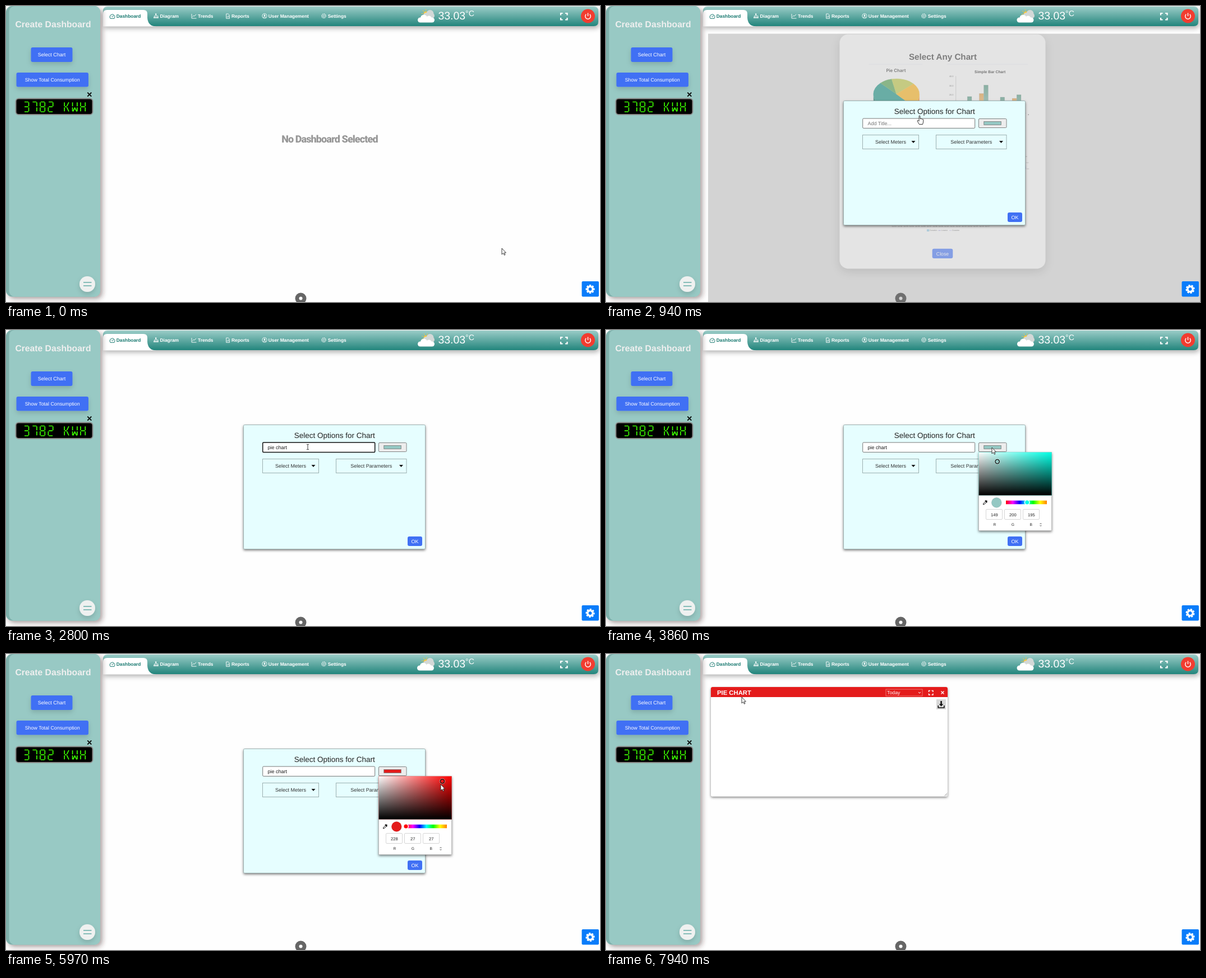
Animation, 1059 px wide and 529 px high, one loop 8000 ms. Source, as an HTML page:

```html
<!DOCTYPE html>
<html lang="en">
<head>
<meta charset="utf-8">
<title>Dashboard</title>
<style>
html, body { margin: 0; width: 100%; height: 100%; overflow: hidden; background: #fefefe; }
svg { display: block; width: 100%; height: 100%; }
text { font-family: "Liberation Sans", Arial, sans-serif; text-rendering: geometricPrecision; }
.b { font-weight: 700; }
.m { text-anchor: middle; }
.e { text-anchor: end; }
.w { fill: #fff; }
.serif { font-family: "Liberation Serif", Times, serif; font-weight: 700; }
.line { fill: none; stroke: #fff; stroke-width: 1; }
</style>
</head>
<body>
<svg id="stage" viewBox="0 0 1059 529" preserveAspectRatio="none">
  <defs>
    <linearGradient id="bar" x2="0" y2="1"><stop stop-color="#9accc7"/><stop offset="1" stop-color="#23857c"/></linearGradient>
    <linearGradient id="white"><stop stop-color="#fff"/><stop offset="1" stop-color="#fff" stop-opacity="0"/></linearGradient>
    <linearGradient id="black" x2="0" y2="1"><stop stop-opacity="0"/><stop offset="1"/></linearGradient>
    <linearGradient id="fade" x2="0" y2="1"><stop stop-color="#fff" stop-opacity="0"/><stop offset="1" stop-color="#fff" stop-opacity=".4"/></linearGradient>
    <linearGradient id="hues"></linearGradient>
    <filter id="soft" x="-20%" y="-50%" width="140%" height="220%"><feDropShadow dx="2" dy="4" stdDeviation="4" flood-opacity=".3"/></filter>
    <filter id="light" x="-30%" y="-60%" width="160%" height="260%"><feDropShadow dx="0" dy="4" stdDeviation="4" flood-opacity=".15"/></filter>
    <filter id="side" x="-10%" y="-5%" width="130%" height="112%"><feDropShadow dx="4" dy="4" stdDeviation="4.5" flood-color="#402828" flood-opacity=".42"/></filter>
    <filter id="box" x="-10%" y="-10%" width="120%" height="125%"><feDropShadow dx="0" dy="2" stdDeviation="2" flood-opacity=".5"/></filter>
    <filter id="pop" x="-10%" y="-10%" width="120%" height="125%"><feDropShadow dx="0" dy="5" stdDeviation="8" flood-opacity=".2"/></filter>
  </defs>

  <rect width="1059" height="529" fill="#fefefe"/>
  <text id="empty" class="m" x="577" y="244" font-size="18" fill="#989898" style="font-family:Roboto,sans-serif;font-weight:900;letter-spacing:-.9px">No Dashboard Selected</text>
  <g id="knob"><circle cx="525.5" cy="522.5" r="10" fill="#666"/><circle cx="525.5" cy="522.5" r="3" fill="#fff"/></g>

  <g id="card">
    <rect x="187" y="59" width="422" height="195.5" rx="3" fill="#fff" filter="url(#box)"/>
    <path d="M187 77V62q0-3 3-3H606q3 0 3 3V77Z" fill="#e41b1b"/>
    <text class="b w" x="198" y="72.7" font-size="11.3">PIE CHART</text>
    <rect x="499" y="63" width="65" height="12" fill="none" stroke="#ee8d86" stroke-width=".8"/>
    <text class="w" x="501" y="72.2" font-size="8.8">Today</text>
    <path class="line" d="M557 68l2 2.2 2-2.2" stroke-width="1.2"/>
    <path class="line" d="M575.5 68V65.500h2.500M580.500 65.500H583V68M583 70.500V73h-2.500M578 73h-2.500V70.500" style="stroke-width:1.4"/>
    <path class="line" d="M597.500 66.500l5 5M602.500 66.500l-5 5" style="stroke-width:1.4"/>
    <rect x="589" y="81" width="17" height="18" fill="#d9d9d9"/>
    <path d="M596.300 84h2.600v5.500h2.600l-3.900 4-3.900-4h2.600ZM591.500 92h1.600v3.200h9V92h1.600v4.800h-12.200Z" fill="#111"/>
    <path d="M603.500 253.500l5-5M606 253.500l2.500-2.500" stroke="#777" stroke-width=".7"/>
  </g>

  <rect id="shade" x="182" y="49.500" width="877" height="480"/>
  <g id="chooser"></g>
  <g id="options"></g>
  <g id="picker"></g>

  <g filter="url(#soft)"><path d="M181 1H1048q8 0 8 8V28q0 8-8 8H173V9q0-8 8-8Z" fill="url(#bar)"/></g>
  <path d="M173 36.500V14q0-7 7-7H245q7 0 7 7V21Q253 36.500 268 36.500Z" fill="#fff"/>
  <g id="nav"></g>
  <g id="sun"></g>
  <g fill="#d3d8d7"><circle cx="756" cy="13.500" r="6.500"/><circle cx="749" cy="16" r="4"/><rect x="744" y="13" width="20" height="9" rx="4.500"/></g>
  <g id="cloud" fill="#fff"><rect x="734" y="20.500" width="30" height="9" rx="4.500"/><circle cx="745" cy="21.500" r="6"/><circle cx="754" cy="22.500" r="5"/></g>
  <text class="w" x="770.500" y="24" font-size="19.400">33.03<tspan font-size="14" dy="-6">°C</tspan></text>
  <path class="line" d="M989 16.500V13h3.500M997 13h3.500v3.500M1000.500 21v3.500H997M992.500 24.500H989V21" style="stroke-width:2.200"/>
  <circle cx="1037.500" cy="18" r="12.500" fill="#f23c30"/>
  <path class="line" d="M1034.300 14.800a4.800 4.800 0 1 0 6.400 0M1037.500 12.500V18" style="stroke-width:1.400"/>

  <g filter="url(#side)"><rect width="168" height="519.500" rx="11" fill="#7eb0ab"/></g>
  <rect x="5.500" width="162.500" height="519.500" rx="10" fill="#98c9c4"/>
  <text class="b m" x="84" y="37.500" font-size="15.700" fill="#efefef">Create Dashboard</text>
  <g filter="url(#light)" fill="#4070f4">
    <rect x="44.500" y="74" width="74" height="26" rx="3"/>
    <rect x="18.500" y="119" width="128.500" height="25.500" rx="3"/>
  </g>
  <g id="focus" fill="none">
    <rect x="44.700" y="74" width="73.800" height="26" rx="2.500" stroke="#101010" stroke-width="1.500"/>
    <rect x="45.700" y="75" width="71.800" height="24" rx="2" stroke="#fff" stroke-width=".5" opacity=".6"/>
  </g>
  <text class="w m" x="81.500" y="90" font-size="9">Select Chart</text>
  <text class="w m" x="82.700" y="134.700" font-size="8.900">Show Total Consumption</text>
  <path d="M145.300 154.600l7 7M152.300 154.600l-7 7" stroke="#000" stroke-width="1.800"/>
  <rect x="17.500" y="165.500" width="137" height="28.500" rx="5" fill="#000" stroke="#8a8a8a" stroke-width="2"/>
  <g id="lcd" fill="none" stroke="#3cff00" stroke-width="1.700"></g>
  <g filter="url(#light)"><circle cx="145" cy="497" r="14" fill="#eff1f0"/></g>
  <path d="M138 494h14.500M138 500h14.500" stroke="#86bdb8" stroke-width="1.800"/>

  <rect x="1026.500" y="492" width="30.500" height="27.500" rx="2" fill="#0a7cfa"/>
  <g id="gear"></g>
  <g id="cursors" stroke="#222" stroke-width=".9" stroke-linejoin="round" fill="#fff">
    <path id="arrow" d="M0 0V11L2.600 8.700 4.400 12.300 6 11.600 4.300 8H7.400Z"/>
    <path id="hand" d="M-.9 8V1Q0-.6 1 1V6Q2.300 5 3 6.400 4.300 5.600 5 7 6.600 6.400 6.700 8.500V11.500L5.600 16H-.6L-3.700 10.500Q-4.300 8.400-2.300 9L-.9 10.300Z"/>
    <path id="beam" d="M-2-4.500H-.6L0-4 .6-4.500H2M0-4V4M-2 4.500H-.6L0 4 .6 4.500H2" fill="none"/>
  </g>
</svg>
<script>
const $ = id => document.getElementById(id);
const BLUE = '#4070f4';
const text = (x, y, size, str, cls = '', fill = '') =>
  `<text x="${x}" y="${y}" font-size="${size}" class="${cls}" ${fill && `fill="${fill}"`}>${str}</text>`;
const rect = (x, y, w, h, fill, more = '') =>
  `<rect x="${x}" y="${y}" width="${w}" height="${h}" fill="${fill}" ${more}/>`;
const path = (d, stroke, width = 1, fill = 'none') =>
  `<path d="${d}" fill="${fill}" stroke="${stroke}" stroke-width="${width}"/>`;
const dot = (x, y, r, fill, more = '') => `<circle cx="${x}" cy="${y}" r="${r}" fill="${fill}" ${more}/>`;
const each = (list, fn) => list.map(fn).join('');
const range = n => [...Array(n).keys()];
const polar = (cx, cy, rx, ry, deg) => {
  const a = deg * Math.PI / 180;
  return `${(cx + rx * Math.cos(a)).toFixed(2)} ${(cy + ry * Math.sin(a)).toFixed(2)}`;
};

function gearShape(r, hole, fill) {
  const teeth = each(range(8), i => `<rect x="${-r * .22}" y="${-r}" width="${r * .44}" height="${r}" rx=".6" transform="rotate(${i * 45})"/>`);
  return `<g fill="${fill}">${teeth}<circle r="${r * .76}"/></g><circle r="${r * .36}" fill="${hole}"/>`;
}

function pieChart() {
  const cx = 523.800, cy = 165, rx = 38, ry = 25.500, depth = 10;
  const slice = (from, to, fill) =>
    path(`M${cx} ${cy}L${polar(cx, cy, rx, ry, from)}A${rx} ${ry} 0 ${to - from > 180 ? 1 : 0} 1 ${polar(cx, cy, rx, ry, to)}Z`, fill, .3, fill);
  const wall = (from, to, fill) =>
    path(`M${polar(cx, cy, rx, ry, from)}A${rx} ${ry} 0 0 1 ${polar(cx, cy, rx, ry, to)}v${depth}A${rx} ${ry} 0 0 0 ${polar(cx, cy + depth, rx, ry, from)}Z`, 'none', 0, fill);
  return wall(47, 180, '#0a6f62') + wall(0, 47, '#f08a12') +
    slice(47, 226, '#0d8d7e') + slice(226, 258, '#4c9c48') +
    slice(258, 318, '#b9c43c') + slice(318, 407, '#f9ae12');
}

function simpleBars() {
  const tops = [[9, 19, 27], [6, 32, 46], [13, 4, 26], [7, 24, 30]];
  const fills = ['#8092c0', '#e0973a', '#4a917a'];
  const bar = (x, h, fill) => rect(x, 196 - h, 7.200, h, fill, 'stroke="#6665" stroke-width=".5"') + rect(x, 196 - h, 7.200, h, 'url(#fade)');
  return path('M622 135V196.500H738', '#999', .5) +
    each(range(5), i => text(618, 137 + i * 15, 3.600, `${40 - i * 10}.0`, 'e', '#555')) +
    each(tops, (group, g) => each(group, (h, i) => bar(626 + g * 27.200 + i * 7.500, h, fills[i])) +
      text(637 + g * 27.200, 202, 3.300, 2011 + g, 'm', '#444')) +
    dot(742, 199, .8, '#666');
}

function periodBars() {
  const now = [7, 6, 6, 6, 6, 15, 31, 40, 54, 55, 54, 49, 54, 46, 45, 52];
  const past = [5, 6, 6, 5, 6, 10, 18, 34, 47, 57, 51, 43, 58, 54, 47, 50, 53, 54, 53, 47];
  return each(range(7), i => path(`M473 ${223.500 + i * 10.250}H592`, '#ccc', .5) +
      text(470, 225 + i * 10.250, 4.600, 300 - i * 50, 'e', '#444')) +
    each(range(10), i => path(`M${473 + i * 12} 223.500V285`, '#ddd', .5) +
      text(476 + i * 12, 291.500, 4.300, `${i * 2}:00`, 'm', '#444')) +
    each(past, (h, i) => rect(474 + i * 5.950, 285 - h, 2.600, h, '#efa794')) +
    each(now, (h, i) => rect(476.600 + i * 5.950, 285 - h, 2.700, h, '#c23f28')) +
    path('M473 223V285H592', '#555', .6) +
    `<text transform="translate(461 271) rotate(-90)" font-size="4" fill="#444">Active Energy (kWh)</text>`;
}

function gauge() {
  const arc = r => `M${677 - r} 289A${r} ${r + 3} 0 0 1 ${677 + r} 289`;
  return path(arc(60), '#7c86da', 1.400) + path(arc(57.500), '#a9d8ee', 1.800) + path(arc(54.500), '#9a8fdc', .6) +
    each(range(41), i => {
      const a = 180 + i * 4.500;
      return path(`M${polar(677, 289, 54, 57, a)}L${polar(677, 289, i % 2 ? 52 : 50, i % 2 ? 55 : 53, a)}`, '#999', .4);
    }) +
    each(range(21), i => {
      const [x, y] = polar(677, 290, 64, 67, 180 + i * 9).split(' ');
      return text(x, y, 2.600, i * 10, 'm', '#888');
    }) +
    path('M675.500 289L674.500 226L678.500 289Z', '#6fb9d8', .5, '#8fd0e6') +
    path('M677 287.500L621 267.500L676 290Z', '#7d6fd0', .5, '#8d80da') + dot(677, 289, 2, '#7d55b8') +
    rect(654, 256.500, 11, 9.500, 'none', 'stroke="#6fc3dc" stroke-width=".8"') + text(659.500, 263, 4.500, '60', 'm', '#6fc3dc') +
    rect(689.500, 256.500, 11, 9.500, 'none', 'stroke="#9a8fdc" stroke-width=".8"') + text(695, 263, 4.500, '10', 'm', '#9a8fdc');
}

function barLine() {
  const bars = [4, 27, 37, 23, 44, 30, 24, 6, 3, 24, 63, 52, 35];
  const upper = [314, 321, 341, 362, 373, 367, 362, 357, 346, 333, 321, 318, 314, 333];
  const lower = [360, 353, 347, 362, 350, 356, 360, 366, 368, 352, 322, 330, 340, 354];
  const px = i => 520 + i * 9.620;
  const line = (ys, color) => path('M' + ys.map((y, i) => `${px(i)} ${y}`).join('L'), color, .6);
  return each(range(10), i => text(513, 311 + i * 7.800, 3.200, 900 - i * 50, 'e', '#777') +
      text(680, 311 + i * 7.800, 3.200, `${900 - i * 50}.00kwh`, '', '#777')) +
    each(bars, (h, i) => rect(px(i) - 4, 380.500 - h, 8, h, '#8cc3e0')) +
    each(range(17), i => text(px(i), 385, 3, `Jul ${String(i + 1).padStart(2, '0')}`, 'm', '#666')) +
    line(upper, '#b3afe0') + line(lower, '#7f7cc4') +
    each(upper, (y, i) => dot(px(i), y, .8, '#fff', 'stroke="#a49fd8" stroke-width=".5"')) +
    each(lower, (y, i) => dot(px(i), y, .9, '#6e6cba')) +
    dot(520, 314.500, 2.200, '#fff', 'stroke="#a49fd8" stroke-width=".6"') +
    text(523, 315.500, 3, 'Max 842', '', '#666') + text(561, 374, 3, 'Lowest', '', '#666') +
    text(589, 358.500, 3, 'Duration', '', '#666') + text(627, 319, 3, 'Highest', '', '#666') + text(646, 334, 3, 'last target', '', '#666') +
    `<text transform="translate(507 349) rotate(-90)" font-size="3.300" fill="#555">Power</text>` +
    `<text transform="translate(694 340) rotate(90)" font-size="3.300" fill="#555">Energy</text>` +
    rect(574, 389, 4, 3.500, '#8cc3e0') + text(579, 392, 3.200, 'Duration', '', '#555') +
    path('M593 390.800h4', '#7f7cc4', .8) + text(598, 392, 3.200, 'Lowest', '', '#555') +
    path('M611 390.800h4', '#b3afe0', .8) + text(616, 392, 3.200, 'Duration', '', '#555');
}

function buildChooser() {
  const rules = 'M478 115.500H567M607 115.500H741M458 206H566M458 297H574';
  $('chooser').innerHTML = `<g filter="url(#pop)">${rect(430, 66, 340, 388, '#f4f4f4', 'rx="14"')}</g>` +
    text(600.500, 108, 14.100, 'Select Any Chart', 'b m', '#333') + path(rules, '#dfe0ea', .8) +
    `<text x="523" y="128" font-size="7.300" class="b m" fill="#333" style="font-family:Inter,sans-serif;font-weight:600">Pie Chart</text>` +
    text(678.500, 130, 6.300, 'Simple Bar Chart', 'b m', '#222') +
    text(533.700, 216, 8, 'Period over Period', 'serif m', '#111') +
    text(677, 214.300, 6.500, 'Gauge Chart', 'serif m', '#111') +
    text(601.500, 307, 8.300, 'Bar Line Graph', 'serif m', '#111') +
    pieChart() + simpleBars() + periodBars() + gauge() + barLine() +
    rect(583, 421, 34, 16, BLUE, 'rx="3"') + text(600, 432, 8.100, 'Close', 'm w');
}

function buildOptions() {
  const drop = (x, w, label, cx, tri) => rect(x + .5, 230.500, w, 25, 'none', 'stroke="#9db0b0"') +
    text(cx, 246, 9, label, 'm', '#333') + path(`M${tri} 241h7l-3.500 4Z`, 'none', 0, '#111');
  $('options').innerHTML = `<g filter="url(#box)">${rect(423.500, 169.500, 324, 222, '#e6feff', 'rx="2" stroke="#8fa3a3" stroke-width=".8"')}</g>` +
    text(585.700, 192.700, 13.500, 'Select Options for Chart', 'm', '#222') +
    '<rect id="field" x="457.700" y="201" width="200" height="17.400" rx="1.500" fill="#fff"/><text id="typed" x="466.500" y="212.500" font-size="9"></text>' +
    rect(664.500, 201.500, 49.500, 16, '#ededed', 'rx="1.500" stroke="#777" stroke-width=".9"') +
    '<rect id="swatch" x="673.800" y="206.500" width="30.500" height="6" stroke="#777" stroke-width=".8"/>' +
    drop(457, 100, 'Select Meters', 507.500, 544.500) + drop(588, 125.500, 'Select Parameters', 651.200, 701) +
    rect(716, 369, 26, 17, BLUE, 'rx="3"') + text(729, 380.500, 9, 'OK', 'm w');
}

function buildPicker() {
  const field = (i, name) => rect(677.500 + i * 33, 320.500, 29, 18, '#fff', 'rx="1.500" stroke="#ccc" stroke-width=".8"') +
    `<text id="num${i}" class="m" x="${692.300 + i * 33}" y="332.500" font-size="7.600" fill="#222"></text>` +
    text(693 + i * 32.400, 350.300, 6.700, name, 'm', '#222');
  $('hues').innerHTML = each(range(7), i => `<stop offset="${i / 6}" stop-color="hsl(${Math.max(30, 360 - i * 60)},100%,50%)"/>`);
  $('picker').innerHTML = `<g filter="url(#box)">${rect(664.500, 218.500, 130, 140, '#fff', 'stroke="#aaa" stroke-width=".7"')}</g>` +
    '<rect id="plane" x="664.500" y="218.500" width="130" height="77"/>' +
    rect(664.500, 218.500, 130, 77, 'url(#white)') + rect(664.500, 218.500, 130, 77, 'url(#black)') +
    '<g id="ring"><circle r="4.600" fill="none" stroke="#fff" stroke-width=".6"/><circle id="spot" r="3.700" stroke="#111" stroke-width="1.300"/></g>' +
    path('M672.500 312l.5-2 4-4 1.500 1.500-4 4Z', '#111', 1) + path('M676 304.800l3.300 3.300M678 306.300l1.300-1.300', '#111', 2) +
    '<circle id="sample" cx="696.300" cy="308.500" r="9" stroke="#0002" stroke-width=".6"/>' +
    rect(713, 304.800, 73, 6.500, 'url(#hues)') +
    '<circle id="thumb" cy="308" r="4.300" stroke="#fff" stroke-width="1.500"/>' +
    each(['R', 'G', 'B'], (n, i) => field(i, n)) +
    path('M773.500 347l1.500-1.500 1.500 1.500M773.500 349l1.500 1.500 1.500-1.500', '#222', .8);
}

function buildNav() {
  const teal = '#1a7a71';
  const labels = [[196.700, 'Dashboard'], [274.500, 'Diagram'], [342, 'Trends'], [402, 'Reports'], [467.700, 'User Management'], [573.700, 'Settings']];
  $('nav').innerHTML = each(labels, ([x, s], i) => text(x, 21.300, 8.400, s, 'b', i ? '#fff' : teal)) +
    path('M186 22.300a4.500 4.500 0 1 1 7 0ZM189.500 20l2-3.200M187 18.500h.8', teal, 1) +
    path('M267.500 14.500v3M264.500 20v-2.300h6.500V20', '#fff', .8) +
    each([[266, 13.500], [263.300, 19.500], [266.300, 19.500], [269.300, 19.500]], ([x, y]) => rect(x, y, 2.300, 2.300, '#fff')) +
    path('M331 14v8h8.500M332.500 19.500l2-2.500 1.500 1.300 3-3.500', '#fff', .9) +
    path('M392.700 14h3.500l2.300 2.300V22.300h-5.800ZM394.500 20.500v-2M396.500 20.500v-3.500', '#fff', .9) +
    dot(461, 17.800, 4.100, 'none', 'stroke="#fff" stroke-width=".9"') + dot(461, 16.700, 1.500, '#fff') +
    path('M458.300 20.500q2.700-3 5.400 0', '#fff', 1) +
    dot(566.600, 17.800, 1.400, 'none', 'stroke="#fff" stroke-width=".8"') +
    dot(566.600, 17.800, 3.600, 'none', 'stroke="#fff" stroke-width="1.200" stroke-dasharray="1.900 .9"');
}

function buildLcd() {
  const seg = {
    a: 'M1.500 1H8.500', b: 'M9 1.800V8.700', c: 'M9 10.700V17.700', d: 'M1.500 18.500H8.500', e: 'M.7 10.700V17.700',
    f: 'M.7 1.800V8.700', g: 'M1.500 9.700H8.200', k: 'M1.500 9.700H4.500M5 8.700L8.500 1.500M5 10.700L8.500 18', w: 'M1.500 18L4.800 11.500 8.200 18'
  };
  const glyphs = ['abcdg', 'abc', 'abcdefg', 'abdeg', '', 'efk', 'bcefw', 'bcefg'];
  $('lcd').innerHTML = each(glyphs, (g, i) => `<path transform="translate(${31.500 + i * 14.400} 170.500)" d="${each([...g], c => seg[c])}"/>`);
}

buildChooser(); buildOptions(); buildPicker(); buildNav(); buildLcd();
$('gear').innerHTML = gearShape(8, '#0a7cfa', '#fff');
$('sun').innerHTML = dot(0, 0, 4, '#f4c542') +
  each(range(8), i => `<path d="M0-5.500V-7.500" stroke="#f4c542" stroke-width="1.200" transform="rotate(${i * 45})"/>`);

// Key lists: [tick, values...], linear in between.
const CURSOR = [
  [0, 884, 433, 'arrow'], [1, 140, 150, 'arrow'], [2, 88, 88, 'hand'], [4, 575, 130, 'hand'], [6, 575, 130, 'hand'],
  [8, 543, 261, 'arrow'], [10, 538, 209, 'beam'], [23, 538, 209, 'arrow'], [25, 688, 210, 'arrow'], [29, 688, 210, 'arrow'],
  [35, 769, 247, 'arrow'], [37, 751, 306, 'arrow'], [41, 713, 306, 'arrow'], [44, 775, 233, 'arrow'], [48, 775, 233, 'arrow'],
  [50, 729, 376, 'hand'], [52, 729, 376, 'arrow'], [54, 330, 150, 'arrow'], [60, 242, 77, 'arrow']
];
const CHOOSER = [[1, 0, 1], [2, .4, 1], [4, 1, 1], [5, 1, 1], [8, .3, 1.118], [9, 0, 1.150]];
const SHADE = [[1, 0], [3, .5], [5, .5], [8, 0]];
const COLOR = [[37, 174, .255, .784], [41, 360, .255, .784], [42, 360, .255, .784], [44, 360, .8816, .894]];
const TICK = 132.4, LOOP = 8000;

function at(keys, k) {
  let i = keys.findIndex(key => key[0] > k);
  if (i === 0) return keys[0].slice(1);
  if (i < 0) return keys[keys.length - 1].slice(1);
  const a = keys[i - 1], b = keys[i], u = (k - a[0]) / (b[0] - a[0]);
  return a.slice(1).map((v, j) => typeof v === 'number' ? v + (b[j + 1] - v) * u : v);
}

function rgb(h, s, v) {
  return [5, 3, 1].map(n => {
    const q = (n + h / 60) % 6;
    return Math.round(255 * v * (1 - s * Math.max(0, Math.min(q, 4 - q, 1))));
  });
}

const set = (id, attrs) => Object.entries(attrs).forEach(([k, v]) => $(id).setAttribute(k, v));
const show = (id, on) => set(id, { visibility: on ? 'visible' : 'hidden' });

function draw(ms) {
  const k = Math.floor((ms + 8) / TICK), t = k * TICK;

  show('empty', k < 2);
  show('focus', k >= 2 && k < 6);
  show('card', k >= 52);
  show('options', k >= 7 && k < 52);
  show('picker', k >= 27 && k < 49);

  const [alpha, scale] = at(CHOOSER, k), [dim] = at(SHADE, k);
  set('chooser', { opacity: alpha, transform: `translate(600 260) scale(${scale}) translate(-600 -260)` });
  set('shade', { opacity: dim });
  set('knob', { opacity: 1 - 1.3 * dim });

  const count = Math.max(0, Math.min(9, k - 12));
  const focused = k >= 10 && k < 25;
  $('typed').textContent = count ? 'pie chart'.slice(0, count) : 'Add Title...';
  set('typed', { fill: count ? '#1a1a1a' : '#757575' });
  set('field', { stroke: focused ? '#101010' : '#767676', 'stroke-width': focused ? 1.5 : 1 });

  const [h, s, v] = at(COLOR, k);
  const parts = rgb(h, s, v), color = `rgb(${parts})`, pure = `rgb(${rgb(h, 1, 1)})`;
  ['swatch', 'sample', 'spot'].forEach(id => set(id, { fill: color }));
  ['plane', 'thumb'].forEach(id => set(id, { fill: pure }));
  set('thumb', { cx: 713 + (1 - h / 360) * 73 });
  set('ring', { transform: `translate(${665 + 128 * s} ${220 + 70 * (1 - v)})` });
  parts.forEach((n, i) => { $('num' + i).textContent = n; });

  set('gear', { transform: `translate(1041.5 506) rotate(${t * .18})` });
  set('sun', { transform: `translate(748.5 13.5) rotate(${t * .04})` });
  set('cloud', { transform: `translate(${Math.cos(t / 1400 * 2 * Math.PI) - 1} 0)` });

  const [x, y, kind] = at(CURSOR, k);
  set('cursors', { transform: `translate(${x} ${y})` });
  ['arrow', 'hand', 'beam'].forEach(id => show(id, id === kind));
}

const start = performance.now();
function loop(now) {
  draw(Math.max(0, now - start) % LOOP);
  requestAnimationFrame(loop);
}
draw(0);
requestAnimationFrame(loop);
</script>
</body>
</html>
```
